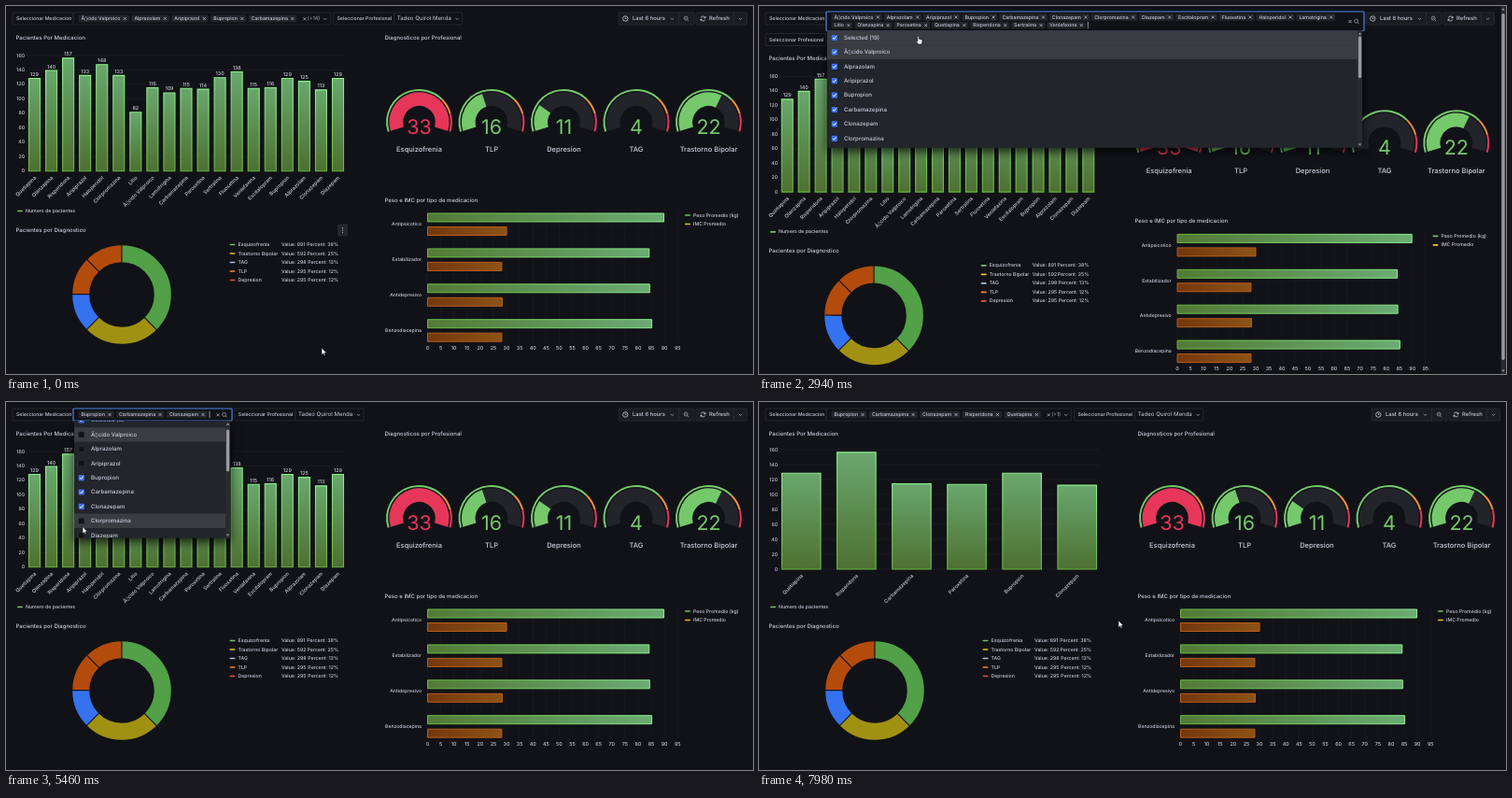
Write an HTML page with a canvas that moves like this. It is 800x394 px and loops after 8000 ms.

```html
<!DOCTYPE html>
<html lang="es">
<head>
<meta charset="utf-8">
<title>Dashboard</title>
<style>
html, body { margin: 0; width: 100%; height: 100%; overflow: hidden; background: #111217; }
canvas { display: block; width: 800px; height: 394px; }
</style>
</head>
<body>
<canvas></canvas>
<script>
const LOOP = 8000, STEP = 140, OPEN = 1820, CLEAR = 3780, CLOSE = 7560, RELOAD = 7700;
const BG = '#111217', INK = '#ccccdc', DIM = '#9a9ba6', EDGE = '#2b2d34', GREEN = '#73bf69';
const ROW = 15.4, FONT = 'Inter, Roboto, sans-serif';

const usage = {
  Quetiapina: 129, Olanzapina: 140, Risperidona: 157, Aripiprazol: 133, Haloperidol: 148,
  Clorpromazina: 133, Litio: 82, 'Ã▯cido Valproico': 116, Lamotrigina: 109, Carbamazepina: 115,
  Paroxetina: 114, Sertralina: 130, Fluoxetina: 138, Venlafaxina: 115, Escitalopram: 116,
  Bupropion: 129, Alprazolam: 125, Clonazepam: 113, Diazepam: 129
};
const drugs = Object.keys(usage).sort((a, b) => (b[0] === 'Ã') - (a[0] === 'Ã') || (a < b ? -1 : 1));
const picks = [['Bupropion', 4340], ['Carbamazepina', 4620], ['Clonazepam', 4900],
  ['Risperidona', 6160], ['Quetiapina', 6440], ['Paroxetina', 6860]];
const diagnoses = [['Esquizofrenia', 891, 38, '#52a047', GREEN], ['Trastorno Bipolar', 592, 25, '#a09112', '#e0c52a'],
  ['TAG', 298, 13, '#3572f0', '#a9bfdc'], ['TLP', 295, 12, '#b34b0d', '#f08a3c'], ['Depresion', 295, 12, '#b34b0d', '#e0524a']];
const gauges = [['Esquizofrenia', 33], ['TLP', 16], ['Depresion', 11], ['TAG', 4], ['Trastorno Bipolar', 22]];
const weights = [['Antipsicotico', 89.8, 30], ['Estabilizador', 84.2, 28.2],
  ['Antidepresivo', 84.4, 28.4], ['Benzodiacepina', 85.2, 28.2]];

const pointerPath = [[0, 338, 366], [560, 349, 190], [1120, 352, 34], [1260, 352, 34], [1540, 346, 13.5],
  [1820, 346, 13.5], [2240, 250, 22], [2380, 250, 22], [2660, 180, 32], [2800, 180, 32], [3500, 82, 36],
  [3920, 82, 36], [4200, 83, 84], [4340, 83, 84], [4620, 83, 100], [4900, 82, 116], [5320, 82, 133.5],
  [5880, 82, 133.5], [6160, 82, 102], [6440, 81, 87], [6860, 81, 79], [7000, 81, 79], [7280, 385, 234]];
const scrollPath = [[5320, 0], [5460, 8.5], [5880, 183.6]];

const canvas = document.querySelector('canvas'), c = canvas.getContext('2d');
const dpr = window.devicePixelRatio || 1;
canvas.width = 800 * dpr;
canvas.height = 394 * dpr;

function track(keys, t) {
  const i = keys.findIndex(k => k[0] > t);
  if (i < 0) return keys[keys.length - 1].slice(1);
  if (!i) return keys[0].slice(1);
  const a = keys[i - 1], b = keys[i], u = (t - a[0]) / (b[0] - a[0]), e = u * u * (3 - 2 * u);
  return a.slice(1).map((v, j) => v + (b[j + 1] - v) * e);
}

function setFont(size, weight = 500) {
  c.font = `${weight} ${size}px ${FONT}`;
  c.textRendering = 'geometricPrecision'; // fractional glyph advances
}
function text(s, x, y, size = 5.2, color = INK, align = 'left', weight = 500) {
  setFont(size, weight);
  c.textAlign = align;
  c.textBaseline = 'middle';
  c.fillStyle = color;
  c.fillText(s, x, y);
}
function rect(x, y, w, h, fill, stroke, r = 0, line = 0.8) {
  c.beginPath();
  c.roundRect(x, y, w, h, r);
  if (fill) { c.fillStyle = fill; c.fill(); }
  if (stroke) { c.strokeStyle = stroke; c.lineWidth = line; c.stroke(); }
}
function lines(color, width, ...paths) {
  c.strokeStyle = color;
  c.lineWidth = width;
  c.beginPath();
  for (const p of paths)
    for (let i = 0; i < p.length; i += 2) i ? c.lineTo(p[i], p[i + 1]) : c.moveTo(p[i], p[i + 1]);
  c.stroke();
}
function arc(x, y, r, a, b, color, width) {
  c.beginPath();
  c.arc(x, y, r, a, b);
  c.strokeStyle = color;
  c.lineWidth = width;
  c.stroke();
}
function shape(points, x, y, fill, stroke) {
  c.beginPath();
  for (let i = 0; i < points.length; i += 2) c.lineTo(x + points[i], y + points[i + 1]);
  c.closePath();
  c.fillStyle = fill;
  c.fill();
  if (stroke) { c.strokeStyle = stroke; c.lineWidth = 0.6; c.stroke(); }
}
function fade(x0, y0, x1, y1, from, to) {
  const g = c.createLinearGradient(x0, y0, x1, y1);
  g.addColorStop(0, from);
  g.addColorStop(1, to);
  return g;
}
const chevron = (x, y) => lines(DIM, 0.8, [x - 1.7, y - 0.9, x, y + 0.9, x + 1.7, y - 0.9]);
const cross = (x, y, s = 1.5) => lines(INK, 0.7, [x - s, y - s, x + s, y + s], [x + s, y - s, x - s, y + s]);
function lens(x, y) {
  arc(x - 0.4, y - 0.4, 2, 0, 7, DIM, 0.8);
  lines(DIM, 0.8, [x + 1, y + 1, x + 2.7, y + 2.7]);
}
function legend(s, x, y, color) {
  rect(x, y - 0.8, 6, 1.6, color, null, 0.8);
  text(s, x + 9, y);
}

function medicationChart(names, X) {
  const n = names.length, full = n > 6, y0 = full ? 176.7 : 179, k = full ? 0.773 : 0.8;
  const pitch = 338 / (n - 0.28), w = pitch * 0.72;
  text('Pacientes Por Medicacion', 10.5, 34, 6);
  for (let v = 0; v <= 160; v += 20) {
    lines('#1f2127', 0.6, [22, y0 - v * k, X(364), y0 - v * k]);
    text(v, 20, y0 - v * k, 5.2, INK, 'right');
  }
  names.forEach((name, i) => {
    const left = X(24 + i * pitch), top = y0 - usage[name] * k, mid = left + X(w) / 2;
    rect(left + 0.5, top + 0.5, X(w) - 1, y0 - top - 0.5, fade(0, top, 0, y0, '#6aa76e', '#4d7031'));
    lines(fade(0, top, 0, y0, '#8cf08a', '#67b53c'), 1.1,
      [left + 0.5, y0, left + 0.5, top + 0.5, left + X(w) - 0.5, top + 0.5, left + X(w) - 0.5, y0, left, y0]);
    if (full) text(usage[name], mid, top - 3.6, 5.4, INK, 'center');
    c.save();
    c.translate(mid + 1, y0 + 6.3);
    c.rotate(-Math.PI / 4);
    text(name, 0, 0, 5.5, INK, 'right');
    c.restore();
  });
  legend('Numero de pacientes', 12, 219.5, GREEN);
}

function diagnosisChart(X, menu) {
  text('Pacientes por Diagnostico', 10.5, 240, 6);
  const x = X(124), y = 309, total = diagnoses.reduce((s, d) => s + d[1], 0);
  let a = -Math.PI / 2;
  const cuts = [];
  diagnoses.forEach(([name, value, percent, color, mark], i) => {
    const b = a + value / total * 2 * Math.PI, ly = 255.5 + i * 9.5;
    arc(x, y, 43.8, a, b, color, 18);
    cuts.push(a);
    a = b;
    legend(name, X(239.5), ly, mark);
    text(`Value: ${value}`, X(295), ly);
    text(`Percent: ${percent}%`, X(356), ly, 5.2, INK, 'right');
  });
  for (const q of cuts)
    lines(BG, 1.1, [34, 54].flatMap(r => [x + r * Math.cos(q), y + r * Math.sin(q)]));
  if (menu) {
    rect(355, 233.5, 11, 13, '#24262c', null, 1);
    for (const d of [-2.2, 0, 2.2]) rect(360, 239.5 + d, 1, 1, INK);
  }
}

function gaugePanel(X) {
  text('Diagnosticos por Profesional', X(405.5), 34, 6);
  const tilt = 17 * Math.PI / 180, angle = f => Math.PI - tilt + f * (Math.PI + 2 * tilt);
  const red = '#e6365a', green = '#75c96b', ring = [[0, 0.71, green], [0.71, 0.85, '#ee8f35'], [0.85, 1, red]];
  gauges.forEach(([name, value], i) => {
    const x = X(442.5 + i * 77.5), y = 124.3, color = value > 30 ? red : green;
    arc(x, y, 24.7, angle(0), angle(1), '#22242a', 14.6);
    if (value > 4) arc(x, y, 24.7, angle(0), angle((value - 4) / 29), color, 14.6);
    for (const [from, to, tint] of ring) arc(x, y, 34.4, angle(from), angle(to), tint, 2);
    text(value, x, 130.3, 21.5, color, 'center', 400);
    text(name, x, 154, 7.5, INK, 'center');
  });
}

function weightChart(X) {
  text('Peso e IMC por tipo de medicacion', X(405.5), 208.3, 6);
  const at = v => X(451.5 + v * 2.818);
  for (let v = 0; v <= 95; v += 5) {
    lines('#1b1d22', 0.6, [at(v), 217, at(v), 361]);
    text(v, at(v), 366, 5.4, INK, 'center');
  }
  weights.forEach(([name, kg, imc], i) => {
    const y = 222 + i * 37.9, x = at(0);
    text(name, X(445), y + 11.7, 5.1, INK, 'right');
    rect(x, y, at(kg) - x, 9, fade(x, 0, at(kg), 0, '#527a36', '#6bab73'),
      fade(x, 0, at(kg), 0, '#69b83e', '#8cf08e'), 0, 1);
    rect(x, y + 14.5, at(imc) - x, 9, fade(x, 0, at(imc), 0, '#74370d', '#8c5316'), '#b95d1b', 0, 1);
  });
  legend('Peso Promedio (kg)', X(727), 224, GREEN);
  legend('IMC Promedio', X(727), 233.5, '#e8c61c');
}

// Draws the variable selector and returns its right edge.
function selector(s) {
  const { names, open, wide, caret } = s;
  const y = wide ? 12 : 13.5, gap = wide ? 14.4 : 15;
  const shown = open ? names : names.slice(0, 5), rest = names.length - shown.length;
  setFont(5.2);
  let x = 80.5, row = 0;
  const chips = shown.map((name, i) => {
    if (wide && i === 12) { x = 80.5; row = 1; }
    const w = c.measureText(name).width, chip = [name, x, y + row * 8.6, w];
    x += w + gap;
    return chip;
  });
  const last = x - gap + 5;
  setFont(5.4);
  const more = `(+${rest})`, moreWidth = c.measureText(more).width;
  const end = wide ? 648 : !names.length ? 129 : open ? last + 31 : last + 27.5 + moreWidth;

  rect(7, 7, 65, 13, BG, EDGE, 1);
  text('Seleccionar Medicacion', 11, 13.5);
  rect(72, wide ? 6 : 7, end - 72, wide ? 20.5 : 13, BG, open ? '#4d82e6' : EDGE, 1, open ? 1.2 : 0.8);
  for (const [name, cx, cy, w] of chips) {
    rect(cx - 3, cy - 3.7, w + 12.5, 7.4, '#23252b', null, 1);
    text(name, cx, cy);
    cross(cx + w + 5, cy);
  }
  if (open) {
    const my = wide ? 16.5 : 13.8;
    if (names.length) cross(end - 15, my);
    else text('Select value', 77, 13.7, 6.1, DIM, 'left', 400);
    lens(end - 8, my);
    const cx = names.length ? last + 7 : 113.5, cy = wide ? 20.6 : 13.5;
    if (caret) lines(INK, 0.7, [cx, cy - 3.8, cx, cy + 3.8]);
  } else {
    cross(last + 13, 13.8);
    text(more, last + 16, 13.8, 5.4, DIM);
    chevron(last + 21.5 + moreWidth, 13.8);
  }
  return end;
}

function professional(e, y) {
  rect(e + 3, y - 6.5, 65, 13, BG, EDGE, 1);
  text('Seleccionar Profesional', e + 6.8, y);
  rect(e + 68, y - 6.5, 73, 13, BG, EDGE, 1);
  text('Tadeo Quirol Menda', e + 71, y, 6.1, INK, 'left', 400);
  chevron(e + 135.5, y + 0.3);
}

function timeControls(dx) {
  c.save();
  c.translate(dx, 0);
  rect(656, 7, 81, 13, '#1b1c22', EDGE, 1);
  rect(739, 7, 54.5, 13, '#1b1c22', EDGE, 1);
  lines(EDGE, 0.8, [720.5, 7, 720.5, 20], [779.5, 7, 779.5, 20]);
  arc(663.3, 13.5, 2.7, 0, 7, INK, 0.8);
  lines(INK, 0.7, [663.3, 11.9, 663.3, 13.6, 664.6, 13.6]);
  text('Last 6 hours', 671, 13.7, 5.9);
  chevron(713.5, 13.7);
  lens(728.5, 13.5);
  lines(DIM, 0.7, [727, 13.1, 729.2, 13.1]);
  arc(746.5, 13.5, 2.5, 0.4, 2.9, INK, 0.8);
  arc(746.5, 13.5, 2.5, 3.5, 6, INK, 0.8);
  lines(INK, 0.8, [749, 11, 749, 12.8, 747.3, 12.8], [744, 16, 744, 14.2, 745.7, 14.2]);
  text('Refresh', 753, 13.7, 5.9);
  chevron(786.5, 13.7);
  c.restore();
}

function scrollbar(x, top, bottom, from, size) {
  rect(x, top, 5, bottom - top, '#2a2b2e');
  rect(x + 0.8, from, 3.4, size, '#9a9a9c', null, 1.7);
  shape([0, 0, 1.6, -2.4, 3.2, 0], x + 0.9, top + 4.4, '#9a9a9c');
  shape([0, 0, 1.6, 2.4, 3.2, 0], x + 0.9, bottom - 4.4, '#9a9a9c');
}

function checkbox(y, on) {
  rect(77.7, y - 3.1, 6.2, 6.2, on ? '#3d71e8' : BG, on ? null : '#34363d', 0.8, 0.6);
  if (on) lines('#fff', 1, [79.1, y, 80.4, y + 1.4, 82.6, y - 1.4]);
}

function dropdown(s, end) {
  const top = s.wide ? 26.3 : 20.3, right = Math.max(157, end - 2), h = 125.5;
  c.save();
  c.shadowColor = 'rgba(0,0,0,.75)';
  c.shadowBlur = 10 * dpr;
  c.shadowOffsetY = 4 * dpr;
  rect(73, top, right - 73, h, '#22252b');
  c.restore();
  c.save();
  c.beginPath();
  c.rect(73, top, right - 73, h);
  c.clip();
  ['', ...drugs].forEach((name, i) => {
    const y = top + 7.7 + i * ROW - s.scroll;
    const hover = s.x > 73 && s.x < right && s.y >= top && Math.abs(s.y - y) < ROW / 2;
    if (hover || i === 1) rect(73, y - ROW / 2, right - 73, ROW, '#3a3c42');
    checkbox(y, i ? s.names.includes(name) : s.names.length);
    text(i ? name : `Selected (${s.names.length})`, 91, y, 6.1);
  });
  scrollbar(right - 5, top, top + h, top + 6 + s.scroll * 0.365, 45);
  c.restore();
}

function pointer(x, y, hand) {
  if (hand) shape([0, 0.4, 0.8, 0, 1.6, 0.5, 1.8, 3, 4.4, 3.6, 5.2, 4.4, 4.9, 6.8, 4.2, 8.6, 1, 8.6,
    -1.6, 5.6, -1.2, 4.8, 0.1, 5.4], x, y, '#fff', '#111');
  else shape([0, 0, 0, 7.4, 1.7, 5.9, 2.8, 8.3, 4, 7.8, 2.9, 5.4, 5.2, 5.3], x, y, '#fff', '#111');
}

function draw(t) {
  const wide = t >= OPEN && t < CLEAR, open = t >= OPEN && t < CLOSE;
  const names = t < CLEAR ? drugs : picks.filter(p => t >= p[1]).map(p => p[0]);
  const [x, y] = track(pointerPath, t), [scroll] = track(scrollPath, t);
  const blink = t % 1200;
  const state = { wide, open, names, x, y, scroll, caret: blink >= 400 && blink < 1000 };
  const X = v => wide ? v * 0.9924 : v; // the page scrollbar narrows the panels

  c.setTransform(dpr, 0, 0, dpr, 0, 0);
  rect(0, 0, 800, 394, BG);
  c.save();
  c.translate(0, wide ? 22.4 : 0);
  medicationChart(Object.keys(usage).filter(n => t < RELOAD || names.includes(n)), X);
  diagnosisChart(X, !open && x < 368 && y > 230);
  gaugePanel(X);
  weightChart(X);
  c.restore();

  const end = selector(state);
  professional(wide ? 4 : end, wide ? 36 : 13.5);
  timeControls(wide ? -6 : 0);
  if (wide) scrollbar(794.5, 0, 394, 8, 371);
  if (open) dropdown(state, end);
  pointer(x, y, open && x < 360 && y > (wide ? 26 : 20) && y < 146 && !(t >= 5180 && t < 5880));
}

function frame(now) {
  draw(Math.floor(now % LOOP / STEP) * STEP);
  requestAnimationFrame(frame);
}
requestAnimationFrame(frame);
</script>
</body>
</html>
```
